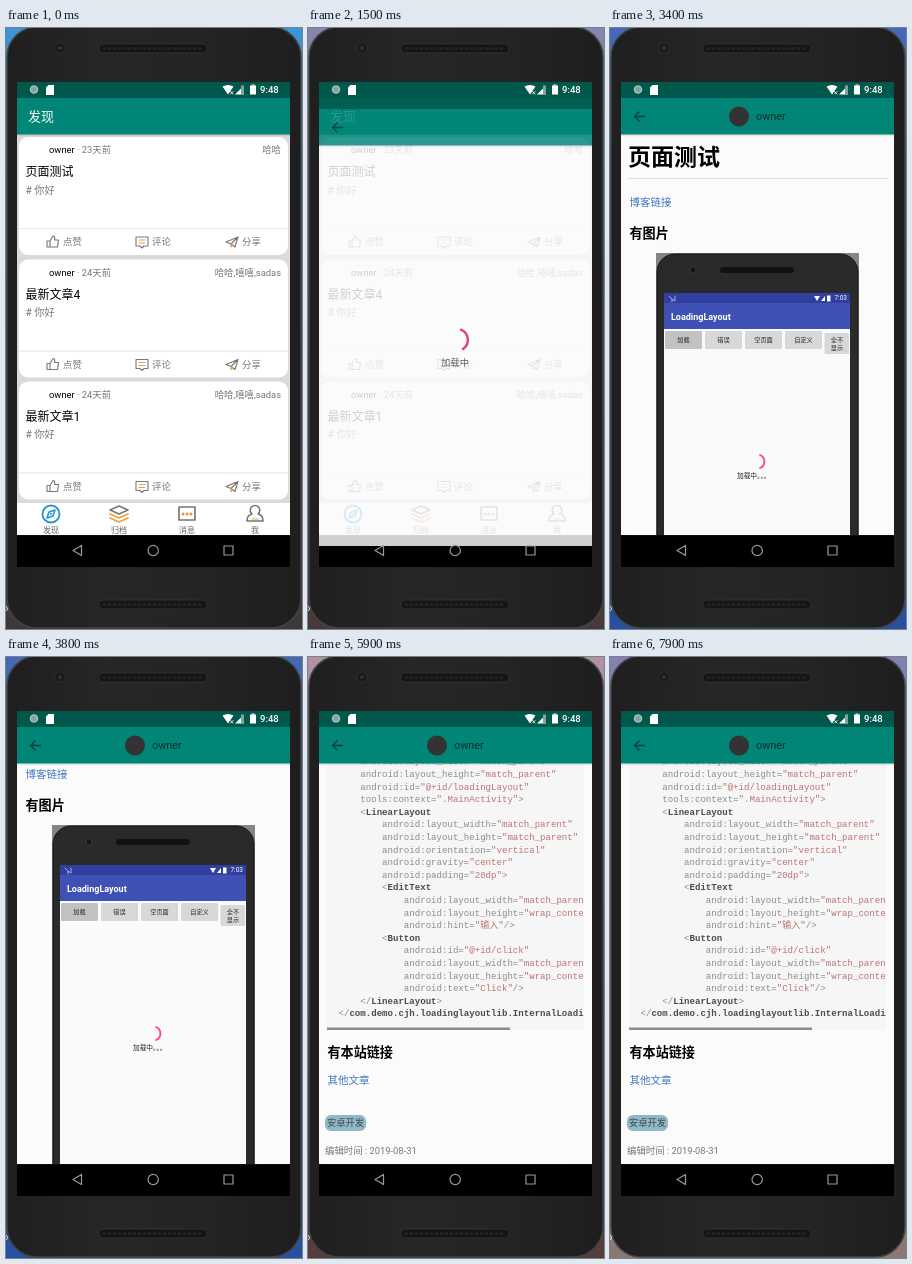
Animation, 296 px wide and 601 px high, one loop 8000 ms. Source, as an HTML page:

```html
<!DOCTYPE html>
<html lang="zh-CN">
<head>
<meta charset="utf-8">
<title>Phone blog app</title>
<style>
html, body { margin: 0; width: 100%; height: 100%; overflow: hidden; background: #222; }
svg { display: block; width: 296px; height: 601px; font-family: Roboto, "Noto Sans CJK SC", "Noto Sans CJK", sans-serif; }
text { white-space: pre; }
.code { font-family: "Liberation Mono", "Noto Sans CJK SC", monospace; font-size: 9.08px; fill: #8c8c8c; }
.b { font-weight: bold; fill: #4c4c4c; }
.r { fill: #bd7373; }
.p { fill: #d49c9c; }
.b.r { fill: #983c3c; }
.line { fill: none; stroke: #777; stroke-width: 1.1; stroke-linejoin: round; stroke-linecap: round; }
.accent { stroke: #f0a040; }
</style>
</head>
<body>
<svg id="stage" viewBox="0 0 296 601"></svg>
<script>
const USER = 'owner';
const GRAY = '#777';

const rect = (x, y, w, h, fill, more = '') =>
  `<rect x="${x}" y="${y}" width="${w}" height="${h}" fill="${fill}" ${more}/>`;
const circle = (x, y, r, fill, more = '') =>
  `<circle cx="${x}" cy="${y}" r="${r}" fill="${fill}" ${more}/>`;
// y is the middle of the line of text
const text = (x, y, size, str, fill = '#000', more = '') =>
  `<text x="${x}" y="${y + size * 0.37}" font-size="${size}" fill="${fill}" ${more}>${str}</text>`;
const group = (x, y, content, more = '') => `<g transform="translate(${x} ${y})" ${more}>${content}</g>`;
const path = (d, cls = '', style = '') => `<path class="line ${cls}" d="${d}" style="${style}"/>`;
const END = 'text-anchor="end"', MID = 'text-anchor="middle"', BOLD = 'font-weight="bold"';

const icons = {
  like: path('M-6-1h3v6h-3zM-3-1L0-6q2.500 0 1.500 4h4l-1 7h-7.500'),
  comment: path('M-6-5H6V4H2L0 6-2 4H-6z') + path('M-3-2H3M-3 1H3', 'accent'),
  share: path('M-6 0L6-5 3 5-1 2zM-1 2L6-5') + path('M-1 2v3l2-2', 'accent'),
  compass: circle(0, 0, 8.5, 'none', 'stroke="#2595d0" stroke-width="1.8"') +
    path('M4-4L2 2-4 4-2-2z', '', 'stroke:#2595d0;stroke-width:1.6') + circle(0, 0, 1, '#2595d0'),
  layers: path('M0-8L9-4 0 0-9-4z', '', 'stroke-width:1.6') +
    path('M-9 0L0 4 9 0M-9 4L0 8 9 4', 'accent', 'stroke-width:1.7'),
  message: path('M-8-7H8V6H-8z', '', 'stroke-width:1.7') +
    [-4, 0, 4].map(x => circle(x, 0, 1.5, '#f09030')).join(''),
  person: path('M-8 7q0-6 5-7a4.800 4.800 0 1 1 6 0q5 1 5 7z', '', 'stroke-width:1.6') +
    path('M-3 5H3', 'accent')
};

function phone() {
  const speaker = y => rect(93, y, 108, 9, '#151515', 'rx="4.5" stroke="#303030"') +
    path(`M98 ${y + 4.5}H197`, '', 'stroke:#222;stroke-width:3;stroke-dasharray:1 4');
  return rect(1, -1, 294, 601, 'url(#body)', 'rx="30" stroke="#444" stroke-width="1.5"') +
    circle(54, 20, 5, '#191919', 'stroke="#2c2c2c"') + circle(54, 20, 2, '#2e323a') +
    speaker(16) + speaker(572);
}

const actions = [['like', '点赞', 47], ['comment', '评论', 136], ['share', '分享', 226]];
const card = (y, title, age, tags) => group(0, y,
  rect(13, 0, 269, 118, '#fff', 'rx="9"') +
  text(43, 13, 9.4, USER) + text(71, 13, 9.4, `· ${age}天前`, GRAY) +
  text(275, 13, 9.4, tags, GRAY, END) +
  text(19.5, 35, 12, title) + text(19.5, 53, 10.2, '# 你好', GRAY) +
  rect(13, 91, 269, 1, '#e6e6e6') +
  actions.map(([icon, label, x]) => group(x, 105, icons[icon]) + text(x + 10, 105, 9.4, label, GRAY)).join(''));

const toolbar = () => rect(11, 54, 273, 16, '#00574b') + rect(11, 70, 273, 36.5, '#008577') +
  rect(11, 106.5, 273, 2.5, 'url(#shadow)');

const tabs = [['compass', '发现'], ['layers', '归档'], ['message', '消息'], ['person', '我']];
function listScreen() {
  return rect(11, 106, 273, 401, '#dadada') + toolbar() +
    text(22, 88, 13, '发现', '#fff') +
    card(109, '页面测试', 23, '哈哈') +
    card(231.5, '最新文章4', 24, '哈哈,嘻嘻,sadas') +
    card(353.5, '最新文章1', 24, '哈哈,嘻嘻,sadas') +
    rect(11, 475, 273, 32, '#fff') +
    tabs.map(([icon, label], i) => group(45 + 68 * i, 486, icons[icon]) +
      text(45 + 68 * i, 502, 8, label, '#666', MID)).join('');
}

const chip = (x, y, w, label) => rect(x, y, w, 16, '#8dbac8', 'rx="6"') +
  text(x + w / 2, y + 8, 9.3, label, '#444', MID);

const articleHeader = () => circle(30.5, 135, 13, '#333') + text(51, 135, 16.5, USER) +
  text(271, 126, 9.4, '0 赞 · 1 浏览', GRAY, END) + chip(252, 139.5, 23, '哈哈') +
  text(18, 178, 23, '页面测试', '#000', BOLD) + rect(18, 200, 260, 1, '#dcdcdc');

function screenshot() {
  const button = (x, label, fill = '#d8d8d8') => rect(x, 246, 37, 18, fill, 'rx="1"') +
    text(x + 18.5, 255, 6.2, label, '#222', MID);
  return rect(46, 168, 203, 412, '#858585') +
    rect(47, 169, 201, 410, '#2a2a2a', 'rx="18" stroke="#151515"') +
    rect(110, 182, 74, 6, '#111', 'rx="3"') + rect(110, 561, 74, 6, '#111', 'rx="3"') +
    circle(83, 185, 3, '#151515', 'stroke="#383838"') +
    rect(54, 208, 186, 330, '#fafafa') + rect(54, 208, 186, 10, '#303f9f') + rect(54, 218, 186, 26, '#3f51b5') +
    path('M59 211l3 3v3M65 211v5l-3-2', '', 'stroke:#ccd;stroke-width:.8') +
    '<path d="M204 211h6l-3 5zM211 216l4-5v5z" fill="#fff"/>' + rect(217, 210.5, 3.5, 6, '#fff') +
    text(237, 213, 6.5, '7:03', '#fff', END) +
    text(61, 231.5, 9, 'LoadingLayout', '#fff', BOLD) +
    button(55, '加载', '#c2c2c2') + button(95, '错误') + button(135, '空页面') + button(175, '自定义') +
    rect(214.5, 248, 24.5, 21, '#d8d8d8', 'rx="1"') +
    text(227, 254.5, 6.2, '全不', '#222', MID) + text(227, 262.5, 6.2, '显示', '#222', MID) +
    path('M150 370a7 7 0 0 1 0 13', '', 'stroke:#ff4081;stroke-width:1.8') +
    text(127, 391, 6.7, '加载中。。。', '#222') +
    rect(54, 516, 186, 22, '#000') +
    path('M98 523v8l-6-4zM143 527a4 4 0 1 0 8 0a4 4 0 1 0-8 0M195 524h6v6h-6z', '', 'stroke-width:.8');
}

const kotlin = `fun loadTypes(types: String, vg: ViewGroup, typeClick: Any) {
    types.split(",").forEach {
        if (it.isBlank()) {
            return@forEach
        }
        val text = TextView(this).apply {
            val lp = LinearLayout.LayoutParams(
                LinearLayout.LayoutParams.WRAP_CONTENT,
                LinearLayout.LayoutParams.WRAP_CONTENT
            )
            lp.setMargins(0, 0, 10, 0)
            layoutParams = lp
            padding = dip(3)            text
            background = getDrawable(R.drawable.bg)
            setOnClickListener { v ->
                typeClick(v)
            }
        }
        vg.addView(text)
    }
}`;
const xml = `<com.demo.cjh.loadinglayoutlib.InternalLoadingLayout
    xmlns:android="http:\/\/schemas.android.com/apk/res/android"
    xmlns:app="http:\/\/schemas.android.com/apk/res-auto"
    xmlns:tools="http:\/\/schemas.android.com/tools"
    android:layout_width="match_parent"
    android:layout_height="match_parent"
    android:id="@+id/loadingLayout"
    tools:context=".MainActivity">
    <LinearLayout
        android:layout_width="match_parent"
        android:layout_height="match_parent"
        android:orientation="vertical"
        android:gravity="center"
        android:padding="20dp">
        <EditText
            android:layout_width="match_parent"
            android:layout_height="wrap_content"
            android:hint="输入"/>
        <Button
            android:id="@+id/click"
            android:layout_width="match_parent"
            android:layout_height="wrap_content"
            android:text="Click"/>
    </LinearLayout>
</com.demo.cjh.loadinglayoutlib.InternalLoadingLayout>`;

const tokens = /("[^"]*")|((?<=&lt;\/?)[\w.]+|\b(?:fun|if|return|val|this)\b)|(\bloadTypes\b)|(@forEach|\bString\b|\b\d+\b)/g;
const highlight = line => line.replace(/</g, '&lt;').replace(tokens, (s, string, keyword, title) => {
  const cls = string ? 'r' : keyword ? 'b' : title ? 'b r' : 'p';
  return `<tspan class="${cls}">${s}</tspan>`;
});
const codeBlock = (y, h, firstLine, source) => rect(19, y, 257, h, '#f6f6f6') +
  `<g class="code" clip-path="url(#codeClip)">` + source.split('\n').map((line, i) =>
    `<text x="30.5" y="${firstLine + 3 + i * 12.6}">${highlight(line)}</text>`).join('') + '</g>';
const heading = (y, str) => text(19.5, y, 13.1, str, '#000', BOLD);

const articleBody = () =>
  group(0, 107, text(19.5, 117, 10.5, '博客链接', '#4078c0') + heading(148, '有图片') + screenshot()) +
  group(0, 586, heading(126, '有代码') + codeBlock(147, 285, 162, kotlin) + rect(19, 429.5, 144, 2.5, '#8c8c8c') +
    heading(454, 'xml代码')) +
  group(0, 1023, codeBlock(39, 334, 54, xml) + rect(19, 370.5, 183, 2.5, '#8c8c8c') +
    heading(395, '有本站链接') + text(19.5, 423.5, 10.5, '其他文章', '#4078c0') +
    chip(17, 458, 41, '安卓开发') + text(17, 494, 9.4, '编辑时间 : 2019-08-31', GRAY));

function articleScreen() {
  return rect(11, 106, 273, 401, '#fbfbfb') +
    `<g clip-path="url(#contentClip)"><g id="doc"><g id="head">${articleHeader()}</g>` +
    `<g id="article">${articleBody()}</g></g></g>` +
    rect(281, 207, 3, 161, '#b0b0b0', 'id="scrollbar"') +
    `<g id="loading"><g id="spinner">${path('M153 290.700A11 11 0 0 1 155 310', '', 'stroke:#d81b60;stroke-width:2.4')}</g>` +
    text(147, 323.5, 9.3, '加载中', '#444', MID) + '</g>' +
    toolbar() +
    path('M34.500 88.500H25M29 84l-4.500 4.500 4.500 4.500', '', 'stroke:#0b3f39;stroke-width:1.3') +
    `<g id="barName">${circle(129, 88.5, 10, '#333')}${text(146, 88.5, 10.8, USER, '#0c302c')}</g>`;
}

const statusIcons = () => circle(28, 61.5, 4.3, '#9dbab5') + circle(28, 61.5, 2.5, '#7fa39d') +
  '<path d="M42.500 57H48v10h-8v-7.500zM216.500 58.500q5.500-3 11 0L222 66.500zM229 66.500l9-9v9z" fill="#fff"/>' +
  path('M224.500 63.500l2.500 2.500m0-2.500l-2.500 2.500', '', 'stroke:#fff;stroke-width:.9') +
  rect(235, 57.5, 3, 9, '#7fa39d') +
  rect(244, 57.5, 6, 9, '#fff') + rect(245.5, 56.5, 3, 1, '#fff') +
  text(254, 61.5, 9.5, '9:48', '#fff', 'font-weight="500"');
const navIcons = () => path('M75.500 517.500v10l-8.500-5zM142 522.500a5.200 5.200 0 1 0 10.400 0a5.200 5.200 0 1 0-10.400 0M218 518h9v9h-9z',
  '', 'stroke:#9a9a9a;stroke-width:1.2');

const clip = (id, x, y, w, h) => `<clipPath id="${id}">${rect(x, y, w, h, '#000')}</clipPath>`;
const stops = (...colors) => colors.map((c, i) =>
  `<stop offset="${i / (colors.length - 1)}" stop-color="${c}"/>`).join('');

document.getElementById('stage').innerHTML = `<defs>
  ${clip('screenClip', 11, 54, 273, 485)}${clip('contentClip', 11, 106, 273, 401)}${clip('codeClip', 19, 0, 257, 600)}
  <linearGradient id="body">${stops('#1f1f1f', '#262626', '#242424', '#1e1e1e')}</linearGradient>
  <linearGradient id="shadow" x2="0" y2="1">${stops('rgba(0,0,0,.14)', 'rgba(0,0,0,0)')}</linearGradient>
  <linearGradient id="wall" x2="0" y2="1"><stop id="sky"/><stop id="ground" offset="1"/></linearGradient></defs>
  ${rect(0, 0, 296, 601, 'url(#wall)')}${text(-3, 580, 9, 'o', '#fff')}${phone()}
  <g clip-path="url(#screenClip)">${listScreen()}${rect(11, 507.4, 273, 32, '#000')}
  <g id="window">${articleScreen()}</g>${statusIcons()}${navIcons()}</g>`;

const el = Object.fromEntries([...document.querySelectorAll('[id]')].map(e => [e.id, e]));

// time, sky colour, ground colour
const wallpaper = [
  [0, [58, 150, 212], [62, 56, 54]],
  [1500, [134, 134, 172], [72, 56, 58]],
  [2600, [70, 104, 184], [40, 80, 160]],
  [5800, [70, 104, 184], [40, 80, 160]],
  [5900, [176, 148, 166], [84, 60, 58]],
  [7900, [130, 130, 178], [140, 120, 114]]
];
// time, article scroll offset
const scrolls = [[0, 0], [3400, 50], [3500, 95], [3700, 100], [3800, 107], [3900, 230], [4000, 330],
  [4200, 420], [4300, 510], [4400, 570], [4600, 586], [4800, 760], [4900, 880], [5200, 1000], [5400, 1023]];

const lastAt = (keys, t) => keys.findLastIndex(k => k[0] <= t);
const show = (e, on) => e.setAttribute('visibility', on ? 'inherit' : 'hidden');

function paintWallpaper(t) {
  const i = lastAt(wallpaper, t), a = wallpaper[i], b = wallpaper[i + 1] || a;
  const k = b === a ? 0 : (t - a[0]) / (b[0] - a[0]);
  const mix = n => `rgb(${a[n].map((v, c) => Math.round(v + (b[n][c] - v) * k))})`;
  el.sky.setAttribute('stop-color', mix(1));
  el.ground.setAttribute('stop-color', mix(2));
}

function draw(now) {
  const t = Math.floor(now % 8000 / 100) * 100;
  paintWallpaper(t);

  const [opacity, drop] = t < 1400 ? [0, 38] : t < 1500 ? [0.4, 27] : t < 1600 ? [0.83, 11] : [1, 0];
  el.window.setAttribute('opacity', opacity);
  el.window.setAttribute('transform', `translate(0 ${drop})`);

  show(el.loading, t < 2500);
  el.spinner.setAttribute('transform', `rotate(${(t - 1500) * 0.3} 149 301)`);
  show(el.head, t >= 2500);
  show(el.article, t >= 2800);
  show(el.scrollbar, t >= 2500 && t < 3000);

  const scroll = scrolls[lastAt(scrolls, t)][1];
  el.doc.setAttribute('transform', `translate(0 ${-scroll})`);
  show(el.barName, scroll > 0);
}

const start = performance.now();
function tick() {
  draw(performance.now() - start);
  requestAnimationFrame(tick);
}
tick();
</script>
</body>
</html>
```
